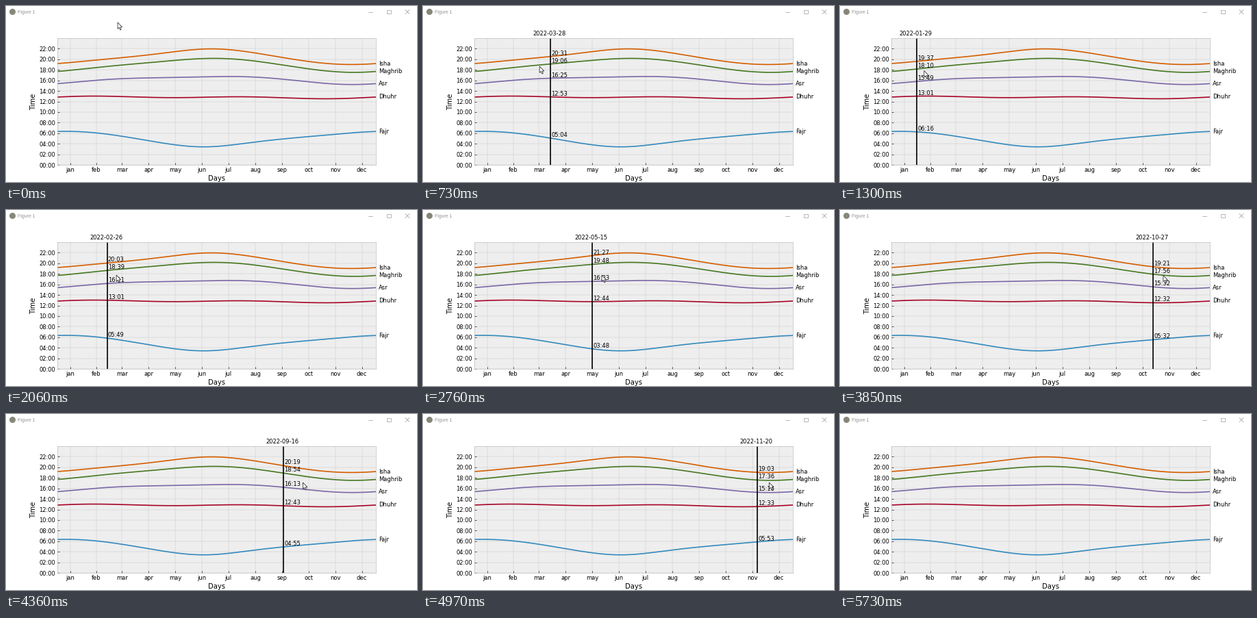
A matplotlib script for the animation above (6.06 s loop, 600 px wide and 257 px high).

```python
import matplotlib.pyplot as plt
import numpy as np
from matplotlib.animation import FuncAnimation
from matplotlib.patches import Circle, Polygon, Rectangle

W, H, DPI = 600, 257, 60
STEP, LOOP = 30, 6060
LAT, LNG, ZONE = 36.75, 3.05, 1
LEFT, RIGHT, TOP, BOTTOM = 75, 540, 47, 232

plt.rcParams.update({
    "font.family": "DejaVu Sans", "font.size": 10,
    "axes.facecolor": "#eeeeee", "axes.edgecolor": "#bcbcbc",
    "axes.labelsize": 12, "axes.grid": True,
    "grid.color": "#b2b2b2", "grid.linestyle": "--", "grid.linewidth": 0.5,
    "xtick.direction": "in", "ytick.direction": "in", "lines.linewidth": 2,
})


def sun(day, hour):
    """Declination (rad) and solar noon (h) for a day of 2022."""
    d = 8035.5 + day + hour / 24 - LNG / 360
    g = np.radians(357.529 + 0.98560028 * d)
    q = 280.459 + 0.98564736 * d
    lon = np.radians(q + 1.915 * np.sin(g) + 0.020 * np.sin(2 * g))
    tilt = np.radians(23.436)
    ra = np.degrees(np.arctan2(np.cos(tilt) * np.sin(lon), np.cos(lon))) / 15
    eqt = (q / 15 - ra + 12) % 24 - 12
    return np.arcsin(np.sin(tilt) * np.sin(lon)), 12 + ZONE - LNG / 15 - eqt


def at_altitude(day, hour, alt, side):
    dec, noon = sun(day, hour)
    lat = np.radians(LAT)
    c = (np.sin(alt) - np.sin(lat) * np.sin(dec)) / (np.cos(lat) * np.cos(dec))
    return noon + side * np.degrees(np.arccos(c)) / 15


def asr(day):
    dec, _ = sun(day, 13)
    alt = np.arctan(1 / (1 + np.tan(abs(np.radians(LAT) - dec))))
    return at_altitude(day, 13, alt, 1)


PRAYERS = [
    ("Fajr", "#348ABD", lambda d: at_altitude(d, 5, np.radians(-19.5), -1)),
    ("Dhuhr", "#A60628", lambda d: sun(d, 12)[1]),
    ("Asr", "#7A68A6", asr),
    ("Maghrib", "#467821", lambda d: at_altitude(d, 18, np.radians(-0.833), 1)),
    ("Isha", "#D55E00", lambda d: at_altitude(d, 18, np.radians(-17.5), 1)),
]


def clock(hours):
    m = int(round(hours * 60))
    return f"{m // 60:02d}:{m % 60:02d}"


fig = plt.figure(figsize=(W / DPI, H / DPI), dpi=DPI, facecolor="white")
ax = fig.add_axes([LEFT / W, 1 - BOTTOM / H, (RIGHT - LEFT) / W, (BOTTOM - TOP) / H])
ax.set(xlim=(0, 365), ylim=(0, 24), xlabel="Days", ylabel="Time")

lengths = np.array([31, 28, 31, 30, 31, 30, 31, 31, 30, 31, 30, 31])
starts = np.cumsum(lengths) - lengths
ax.set_xticks(starts + (lengths - 1) / 2,
              "jan feb mar apr may jun jul aug sep oct nov dec".split())
ax.set_yticks(range(0, 24, 2), [f"{h:02d}:00" for h in range(0, 24, 2)])

days = np.arange(366)
for name, color, rule in PRAYERS:
    y = rule(days - 1)
    ax.plot(days, y, color=color)
    ax.text(368, y[-1], name, va="center")

marker = ax.axvline(0, color="black")
date_text = ax.text(0, 24.2, "", va="bottom")
time_texts = [ax.text(0, 0, "", va="bottom") for _ in PRAYERS]

# Window frame and pointer, in pixels
win = fig.add_axes([0, 0, 1, 1], zorder=5)
win.set(xlim=(0, W), ylim=(H, 0))
win.axis("off")
GREY = "#959595"
win.add_patch(Circle((9.5, 8.5), 4.5, color="#85877a", lw=0))
win.text(17, 11.4, "Figure 1", family="Liberation Sans", size=8.2, color=GREY)
win.plot([529, 535], [8.5, 8.5], color=GREY, lw=0.8)
win.add_patch(Rectangle((556, 5.5), 5.5, 5.5, fill=False, ec=GREY, lw=0.8))
for ya, yb in ((5.5, 11.5), (11.5, 5.5)):
    win.plot([583, 589], [ya, yb], color=GREY, lw=0.8)

ARROW = np.array([(0, 0), (0, 9.3), (2.1, 7.4), (3.7, 11), (5.2, 10.3),
                  (3.7, 6.9), (6.6, 6.9)])
pointer = win.add_patch(Polygon(ARROW, fc="white", ec="#222222", lw=0.9))

# Pointer: time, x, y; the marker line trails behind it: time, x
POINTER = np.array([
    (0, 163, 24), (220, 190, 48), (400, 214, 80), (610, 194, 89),
    (730, 168, 88), (960, 126, 91), (1150, 107, 93), (1240, 112, 94),
    (1360, 138, 95), (1520, 138, 95), (2060, 162, 95), (2120, 180, 95),
    (2400, 217, 95), (2760, 261, 95), (3000, 295, 94), (3360, 379, 91),
    (3640, 484, 93), (3970, 464, 97), (4230, 402, 100), (4360, 436, 100),
    (4580, 466, 100), (5210, 533, 100), (5730, 606, 100)])
MARKER = np.array([
    (240, 185), (480, 211), (610, 207), (730, 183.3), (960, 146),
    (1240, 115), (1360, 107), (1500, 107), (1700, 128), (2060, 148.9),
    (2120, 158), (2730, 242), (2760, 247), (3100, 285), (3360, 328.5),
    (3740, 460), (3970, 453), (4290, 399), (4360, 406.2), (4580, 449),
    (5210, 515), (5340, 536)])


def draw(i):
    t = i * STEP
    x, y = (np.interp(t, POINTER[:, 0], POINTER[:, k]) for k in (1, 2))
    pointer.set_xy(ARROW + (x, y))

    shown = MARKER[0, 0] <= t <= MARKER[-1, 0]
    for artist in (marker, date_text, *time_texts):
        artist.set_visible(shown)
    if shown:
        px = np.interp(t, MARKER[:, 0], MARKER[:, 1])
        day = int(round((px - LEFT) / (RIGHT - LEFT) * 365))
        marker.set_xdata([day, day])
        date_text.set_text(str(np.datetime64("2022-01-01") + (day - 1)))
        date_text.set_x(day - 20)
        for label, (_, _, rule) in zip(time_texts, PRAYERS):
            hours = rule(day - 1)
            label.set_text(clock(hours))
            label.set_position((day + 1, hours))
    return [pointer, marker, date_text, *time_texts]


anim = FuncAnimation(fig, draw, frames=LOOP // STEP, interval=STEP,
                     repeat=True, repeat_delay=0)
plt.show()
```
